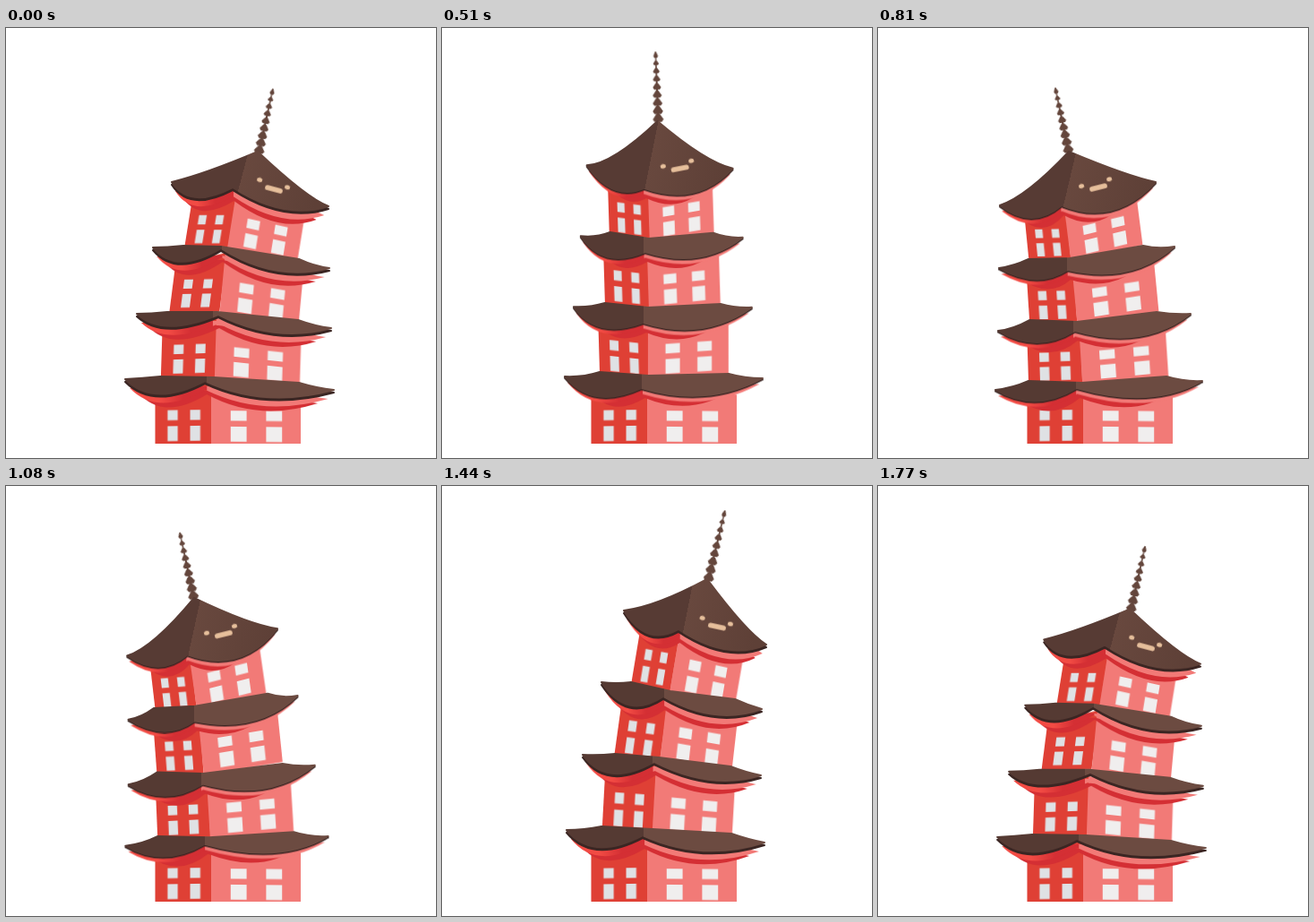
An HTML page without scripts that plays this animation: 480 px wide and 480 px high, repeating every 1800 ms.

```html
<!DOCTYPE html>
<html lang="en">
<head>
<meta charset="utf-8">
<title>Swaying pagoda</title>
<style>
html, body { margin: 0; width: 100%; height: 100%; overflow: hidden; background: #fff; }
svg { display: block; width: 100vw; height: 100vh; }

/* half a sway, played back and forth */
.move { animation: var(--k) .9s ease-in-out infinite alternate; }
.shade { fill: #d42f34; transform-box: fill-box; transform-origin: 45% 0; animation-name: var(--k), shade; }
.eave { fill: url(#under); transform-box: fill-box; transform-origin: 45% 0; animation-name: var(--k), eave; }
.rim { fill: #3b2623; stroke: #3b2623; animation-name: var(--k), rim; }
.roof { fill: url(#tile); stroke: url(#tile); }
.top { fill: url(#cap); stroke: url(#cap); }
.rim, .roof, .top { stroke-width: 2; stroke-linejoin: round; }
.left { fill: #df4035; color: #dfe1e4; }
.right { fill: #f27a77; color: #f0eeee; }

/* the underside shows more while leaning right */
@keyframes shade {
  0%, 40% { transform: translateY(15px) scaleX(.86); }
  56.7%, 100% { transform: translateY(11px) scaleX(.74); }
}
@keyframes eave {
  0%, 40% { transform: translateY(10px) scaleX(.95); }
  56.7%, 100% { transform: translateY(6.5px) scaleX(.97); }
}
@keyframes rim {
  0%, 40% { transform: translateY(3px); }
  56.7%, 100% { transform: translateY(1.5px); }
}

@keyframes roof1 {
  0% { d: path("M185 172Q205 203 253 178Q310 215 360 199Q336 190 281 138Q222 163 185 172Z"); animation-timing-function: ease-in; }
  26.7% { d: path("M195 153Q220 188 261 161Q315 200 360 184Q338 171 288 119Q228 146 195 153Z"); animation-timing-function: ease-out; }
  40% { d: path("M203 139Q228 180 264 160Q318 196 362 177Q340 163 296 104Q238 135 203 139Z"); animation-timing-function: ease-in; }
  56.7% { d: path("M162 153Q190 194 226 179Q285 200 325 157Q295 150 241 104Q190 152 162 153Z"); animation-timing-function: ease-out; }
  66.7% { d: path("M134 176Q172 196 199 173Q260 192 292 139Q260 137 205 104Q160 169 134 176Z"); }
  90%, 100% { d: path("M136 198Q172 226 205 198Q264 222 310 172Q280 166 213 138Q166 188 136 198Z"); }
}
@keyframes roof2 {
  0% { d: path("M164 245Q190 276 240 246Q300 284 361 268Q344 266 327 258L240 244 198 243Q180 245 164 245Z"); animation-timing-function: ease-in; }
  26.7% { d: path("M173 231Q202 266 245 236Q300 272 357 255Q341 252 326 243L252 233 206 230Q188 232 173 231Z"); animation-timing-function: ease-out; }
  40% { d: path("M178 219Q206 262 247 235Q304 268 357 249Q342 245 327 238L255 229 211 219Q194 221 178 219Z"); animation-timing-function: ease-in; }
  56.7% { d: path("M155 232Q180 270 227 250Q290 270 336 234Q319 235 303 229L231 235 188 228Q172 234 155 232Z"); animation-timing-function: ease-out; }
  66.7% { d: path("M139 249Q178 276 208 250Q276 262 317 218Q300 222 286 214L206 228 160 232Q151 246 139 249Z"); }
  90%, 100% { d: path("M135 268Q178 292 212 270Q284 286 331 244Q313 247 296 243L214 257 168 258Q151 266 135 268Z"); }
}
@keyframes roof3 {
  0% { d: path("M146 319Q175 346 237 320Q300 352 363 335Q345 333 326 326L236 317 180 317Q162 319 146 319Z"); animation-timing-function: ease-in; }
  26.7% { d: path("M153 309Q180 342 240 313Q300 342 357 327Q341 324 324 318L240 309 190 307Q169 309 153 309Z"); animation-timing-function: ease-out; }
  40% { d: path("M157 300Q184 338 237 308Q300 340 356 323Q340 320 322 313L242 303 193 299Q174 301 157 300Z"); animation-timing-function: ease-in; }
  56.7% { d: path("M147 311Q172 348 225 329Q292 350 346 312Q328 313 311 308L230 312 182 307Q165 312 147 311Z"); animation-timing-function: ease-out; }
  66.7% { d: path("M141 326Q178 350 219 324Q290 342 338 300Q321 303 305 299L217 310 169 309Q156 322 141 326Z"); }
  90%, 100% { d: path("M134 338Q178 364 220 338Q296 360 349 319Q330 320 311 317L222 328 169 326Q151 336 134 338Z"); }
}
@keyframes roof4 {
  0% { d: path("M133 392Q165 424 222 394Q288 425 366 404Q347 402 327 396L232 390 172 389Q152 391 133 392Z"); animation-timing-function: ease-in; }
  26.7% { d: path("M137 388Q168 420 224 390Q290 420 362 400Q345 397 324 391L234 386 176 385Q155 387 137 388Z"); animation-timing-function: ease-out; }
  40% { d: path("M139 384Q168 419 224 390Q290 420 360 398Q343 395 323 388L235 383 178 380Q158 384 139 384Z"); animation-timing-function: ease-in; }
  56.7% { d: path("M137 389Q168 427 223 402Q296 424 358 391Q338 391 320 386L230 388 176 384Q157 390 137 389Z"); animation-timing-function: ease-out; }
  66.7% { d: path("M137 398Q176 421 222 396Q304 418 356 386Q337 388 320 382L226 386 172 386Q155 396 137 398Z"); }
  90%, 100% { d: path("M131 404Q176 430 222 402Q306 426 362 394Q342 395 322 389L227 396 168 394Q150 402 131 404Z"); }
}

/* each wall is a 100 by 100 panel laid on two edge vectors */
@keyframes left1 {
  0% { transform: matrix(.48,0,-.05,.31,205,209); animation-timing-function: ease-in; }
  26.7% { transform: matrix(.46,.02,-.05,.33,212,193); animation-timing-function: ease-out; }
  40% { transform: matrix(.43,.08,-.06,.36,218,180); animation-timing-function: ease-in; }
  56.7% { transform: matrix(.45,.06,.01,.33,186,193); animation-timing-function: ease-out; }
  66.7% { transform: matrix(.44,-.07,.05,.35,159,201); }
  90%, 100% { transform: matrix(.46,-.01,.03,.3,165,225); }
}
@keyframes right1 {
  0% { transform: matrix(.77,.17,-.05,.31,253,209); animation-timing-function: ease-in; }
  26.7% { transform: matrix(.72,.19,-.05,.34,258,194); animation-timing-function: ease-out; }
  40% { transform: matrix(.72,.16,-.06,.35,261,190); animation-timing-function: ease-in; }
  56.7% { transform: matrix(.71,-.12,.01,.32,231,203); animation-timing-function: ease-out; }
  66.7% { transform: matrix(.72,-.2,.06,.36,203,194); }
  90%, 100% { transform: matrix(.79,-.19,.04,.31,211,225); }
}
@keyframes left2 {
  0% { transform: matrix(.55,-.01,-.04,.31,187,281); animation-timing-function: ease-in; }
  26.7% { transform: matrix(.49,0,-.04,.33,195,270); animation-timing-function: ease-out; }
  40% { transform: matrix(.5,.07,-.05,.36,198,260); animation-timing-function: ease-in; }
  56.7% { transform: matrix(.49,.06,.01,.34,181,269); animation-timing-function: ease-out; }
  66.7% { transform: matrix(.5,-.04,.03,.34,164,273); }
  90%, 100% { transform: matrix(.52,-.01,.02,.31,167,294); }
}
@keyframes right2 {
  0% { transform: matrix(.87,.15,-.03,.32,242,281); animation-timing-function: ease-in; }
  26.7% { transform: matrix(.83,.15,-.03,.33,244,270); animation-timing-function: ease-out; }
  40% { transform: matrix(.79,.14,-.04,.35,248,266); animation-timing-function: ease-in; }
  56.7% { transform: matrix(.79,-.08,.01,.33,230,277); animation-timing-function: ease-out; }
  66.7% { transform: matrix(.82,-.15,.04,.35,214,269); }
  90%, 100% { transform: matrix(.9,-.14,.03,.31,219,294); }
}
@keyframes left3 {
  0% { transform: matrix(.61,-.02,-.01,.32,174,354); animation-timing-function: ease-in; }
  26.7% { transform: matrix(.57,-.01,-.02,.34,179,347); animation-timing-function: ease-out; }
  40% { transform: matrix(.56,.04,-.02,.37,181,341); animation-timing-function: ease-in; }
  56.7% { transform: matrix(.55,.06,.01,.34,175,347); animation-timing-function: ease-out; }
  66.7% { transform: matrix(.56,-.04,.02,.35,169,349); }
  90%, 100% { transform: matrix(.59,-.02,.01,.31,167,363); }
}
@keyframes right3 {
  0% { transform: matrix(.94,.1,-.01,.32,234,354); animation-timing-function: ease-in; }
  26.7% { transform: matrix(.9,.09,-.02,.34,236,348); animation-timing-function: ease-out; }
  40% { transform: matrix(.88,.08,-.02,.35,237,346); animation-timing-function: ease-in; }
  56.7% { transform: matrix(.89,-.06,0,.33,230,354); animation-timing-function: ease-out; }
  66.7% { transform: matrix(.88,-.08,.02,.36,225,346); }
  90%, 100% { transform: matrix(.95,-.09,.02,.31,226,362); }
}
@keyframes spire {
  0% { transform: translate(282px,140px) rotate(12.5deg) scaleY(.95); animation-timing-function: ease-in; }
  26.7% { transform: translate(288px,121px) rotate(13deg) scaleY(1.03); animation-timing-function: ease-out; }
  40% { transform: translate(297px,106px) rotate(13.5deg) scaleY(1.04); animation-timing-function: ease-in; }
  56.7% { transform: translate(242px,105px) rotate(-2.2deg) scaleY(1.01); animation-timing-function: ease-out; }
  66.7% { transform: translate(205px,106px) rotate(-12.5deg) scaleY(1.02); }
  90%, 100% { transform: translate(213px,139px) rotate(-11.8deg) scaleY(.95); }
}
@keyframes face {
  0% { transform: translate(299px,180px) rotate(15deg); animation-timing-function: ease-in; }
  26.7% { transform: translate(302px,163px) rotate(13deg); animation-timing-function: ease-out; }
  40% { transform: translate(307px,157px) rotate(12deg); animation-timing-function: ease-in; }
  56.7% { transform: translate(266px,157px) rotate(-11deg); animation-timing-function: ease-out; }
  66.7% { transform: translate(238px,146px) rotate(-14deg); }
  90%, 100% { transform: translate(246px,178px) rotate(-14deg); }
}
</style>
</head>
<body>
<svg viewBox="0 0 480 480">
  <defs>
    <linearGradient id="tile">
      <stop offset=".39" stop-color="#553a33"/>
      <stop offset=".39" stop-color="#6c4b41"/>
    </linearGradient>
    <linearGradient id="cap" x2="1" y2=".1">
      <stop offset=".485" stop-color="#573b34"/>
      <stop offset=".485" stop-color="#68483e"/>
      <stop offset="1" stop-color="#5e4037"/>
    </linearGradient>
    <linearGradient id="under">
      <stop offset=".15" stop-color="#f24b44"/>
      <stop offset=".27" stop-color="#d42f34"/>
      <stop offset=".39" stop-color="#d42f34"/>
      <stop offset=".39" stop-color="#f27a77"/>
    </linearGradient>
    <clipPath id="ground"><path d="M0 0H480V463.5H0Z"/></clipPath>
    <path id="panes" d="M22 0h18v33h-18zM62 0h18v33h-18zM22 52h18v49h-18zM62 52h18v49h-18z" fill="currentColor"/>
    <g id="west"><path d="M0-55L102-95V118H0Z"/><use href="#panes"/></g>
    <g id="east"><path d="M0-95L101-55V118H0Z"/><use href="#panes"/></g>
    <path id="cone" d="M-2-9H2L6-3 4 0H-4L-6-3Z"/>
  </defs>

  <g clip-path="url(#ground)">
    <g class="left">
      <g class="move" style="--k:left1"><use href="#west"/></g>
      <g class="move" style="--k:left2"><use href="#west"/></g>
      <g class="move" style="--k:left3"><use href="#west"/></g>
      <use href="#west" transform="matrix(.63 -.01 0 .34 166.5 427)"/>
    </g>
    <g class="right">
      <g class="move" style="--k:right1"><use href="#east"/></g>
      <g class="move" style="--k:right2"><use href="#east"/></g>
      <g class="move" style="--k:right3"><use href="#east"/></g>
      <use href="#east" transform="matrix(.99 .01 0 .34 229 427)"/>
    </g>

    <g style="--k:roof4">
      <path class="move shade"/><path class="move eave"/><path class="move rim"/><path class="move roof"/>
    </g>
    <g style="--k:roof3">
      <path class="move shade"/><path class="move eave"/><path class="move rim"/><path class="move roof"/>
    </g>
    <g style="--k:roof2">
      <path class="move shade"/><path class="move eave"/><path class="move rim"/><path class="move roof"/>
    </g>

    <g class="move" style="--k:spire" fill="#64463c">
      <path d="M-1.5 0L-.6-78H.6L1.5 0Z"/>
      <use href="#cone"/>
      <use href="#cone" transform="translate(0 -9) scale(.96)"/>
      <use href="#cone" transform="translate(0 -18) scale(.9)"/>
      <use href="#cone" transform="translate(0 -27) scale(.84)"/>
      <use href="#cone" transform="translate(0 -36) scale(.77)"/>
      <use href="#cone" transform="translate(0 -45) scale(.7)"/>
      <use href="#cone" transform="translate(0 -54) scale(.62)"/>
      <use href="#cone" transform="translate(0 -63) scale(.53)"/>
      <use href="#cone" transform="translate(0 -71) scale(.43 .7)"/>
    </g>

    <g style="--k:roof1">
      <path class="move shade"/><path class="move eave"/><path class="move rim"/><path class="move top"/>
    </g>
    <g class="move" style="--k:face" fill="#e6bf9b">
      <ellipse cx="-18" cy="-6" rx="3" ry="2.5"/>
      <ellipse cx="14" cy="-6" rx="3" ry="2.5"/>
      <rect x="-10" y="-2.8" width="20" height="5.6" rx="2.6"/>
    </g>
  </g>
</svg>
</body>
</html>
```
